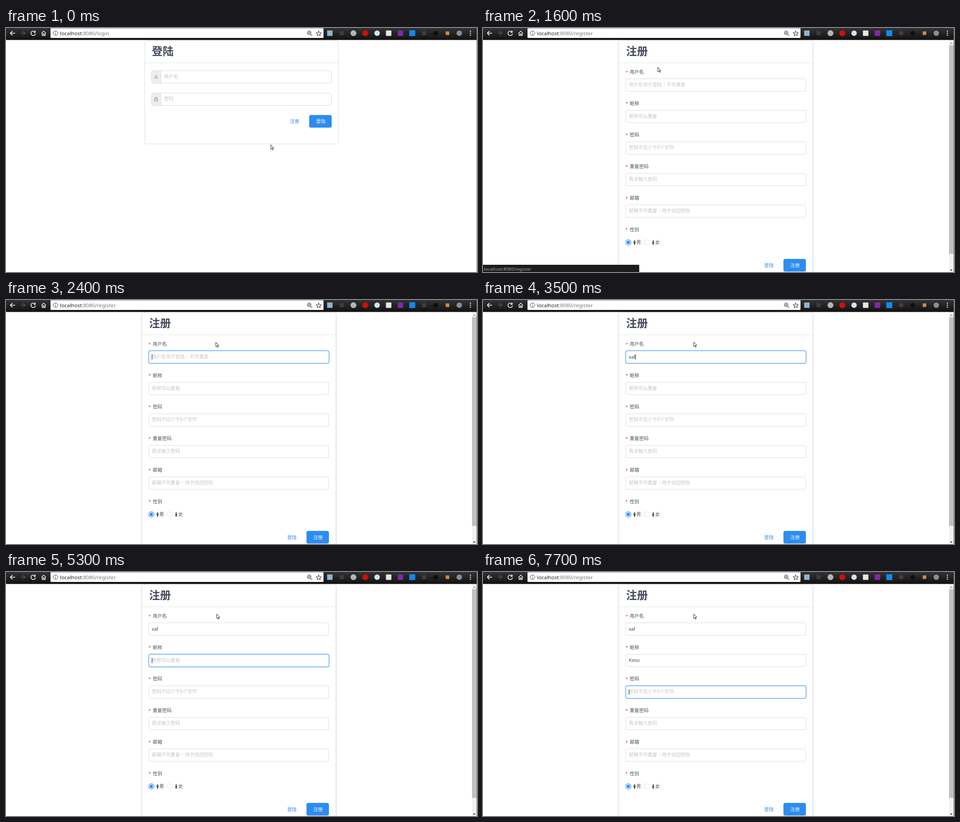
Write an HTML page that moves like this. It is 1037 px wide and 540 px high and loops after 8000 ms.

```html
<!DOCTYPE html>
<html lang="zh-TW">
<head>
<meta charset="utf-8">
<title>登陆 / 注册</title>
<style>
html, body { margin: 0; width: 100%; height: 100%; overflow: hidden; background: #fff }
svg { display: block; width: 1037px; height: 540px }
text { font: 10.4px "Liberation Sans", "Noto Sans CJK TC", "Noto Sans CJK SC", sans-serif; fill: #495060 }
.title { font-size: 24px; font-weight: bold; fill: #464c5b }
.hint { fill: #c3c6cc; font-weight: 300 }
.link { fill: #2d8cf0 }
.white { fill: #fff }
.star { fill: #ed3f14 }
.url, .url text { font: 11.37px "Noto Sans", "Open Sans", sans-serif }
.box { fill: #fff; stroke: #d7dde4 }
.line { fill: none; stroke: #fff; stroke-width: 1.5 }
</style>
</head>
<body>
<svg id="stage" viewBox="0 0 1037 540"></svg>
<script>
const stage = document.getElementById('stage');
const $ = id => document.getElementById(id);

const rect = (x, y, w, h, fill, r = 0, more = '') =>
  `<rect x="${x}" y="${y}" width="${w}" height="${h}" rx="${r}" fill="${fill}" ${more}/>`;
const circle = (x, y, r, fill, more = '') =>
  `<circle cx="${x}" cy="${y}" r="${r}" fill="${fill}" ${more}/>`;
const text = (x, y, s, cls = '', more = '') => `<text x="${x}" y="${y}" class="${cls}" ${more}>${s}</text>`;
const path = (d, more) => `<path d="${d}" ${more}/>`;
const square = (x, size, fill) => rect(x - size / 2, 11.5 - size / 2, size, size, fill, 1);

const card = (x, bottom, title, id) =>
  rect(x + .5, 27.5, 426.5, bottom - 27.5, '#fff', 4, `id="${id}"`) +
  rect(x + .5, 27.5, 426.5, bottom - 27.5, '#fff', 4, `id="${id}Edge" stroke="#dddee1"`) +
  rect(x + 1, 76.5, 426, 1, '#e2e3e6') +
  text(x + 16, 59.5, title, 'title');

const actions = (x, y, link, button, id) =>
  text(x, y + 17.5, link, 'link', `id="${id}"`) +
  rect(x + 42.5, y, 49.5, 28, '#2d8cf0', 4) +
  text(x + 57.5, y + 17.5, button, 'white');

const toolbar = () => {
  const ext = [
    square(713, 12, '#8fb4cf'), square(739, 9, '#3d3d3d'), circle(765, 11.5, 6.5, '#b4b4b4'),
    circle(791, 11.5, 6.5, '#d0100c'), circle(817, 11.5, 6, '#cfe3f5'), square(842.5, 12, '#e6e6e6'),
    square(868.5, 12, '#7d2ba8'), square(894.5, 13, '#1288f5'), circle(920.5, 11.5, 5, '#3f3f3f'),
    circle(946, 11.5, 5, '#0d0d0d'), square(972, 8, '#c98a45'), circle(998, 11.5, 6, '#8d8d8d')
  ];
  return `<linearGradient id="dark" x2="0" y2="1"><stop stop-color="#333"/><stop offset="1" stop-color="#111"/></linearGradient>` +
    rect(0, 0, 1037, 26.5, 'url(#dark)') +
    rect(98, 0.5, 601, 21.5, '#fff', 1) +
    path('M20 11.5H9.5M14.5 6.5L9.5 11.5 14.5 16.5', 'class="line"') +
    path('M32 11.5H42M37 6.5L42 11.5 37 16.5', 'class="line" style="stroke:#555"') +
    path('M63.5 8A5 5 0 1 0 65 12.5', 'class="line"') +
    path('M65 5.5V10.5H60Z', 'fill="#fff"') +
    path('M78 12L83 7 88 12M79.5 11.5V16.5H82V13H84V16.5H86.500V11.5', 'class="line" style="stroke-width:1.3"') +
    circle(109, 11.5, 5, 'none', 'stroke="#444"') +
    path('M109 11V14.5M109 8.300V9.500', 'stroke="#444" stroke-width="1.2"') +
    `<text x="119" y="16" class="url" style="fill:#222">localhost<tspan id="address" fill="#777"></tspan></text>` +
    circle(667.5, 10.5, 3.8, 'none', 'stroke="#444" stroke-width="1.3"') +
    path('M670.3 13.300L674 17M665.500 10.500H669.500M667.500 8.500V12.500', 'stroke="#444" stroke-width="1.2"') +
    path('M688.500 6.500L690 10.200 694 10.500 691 13 692 17 688.500 14.800 685 17 686 13 683 10.500 687 10.200Z',
      'fill="none" stroke="#444" stroke-width="1.1"') +
    ext.join('') +
    [7, 11.5, 16].map(y => circle(1022.5, y, 1.3, '#fff')).join('');
};

const loginInput = (y, hint, icon) =>
  rect(320.5, y, 396, 27.5, '#fff', 4, 'stroke="#d7dde4"') +
  path(`M341 ${y}H324.5Q320.5 ${y} 320.5 ${y + 4}V${y + 23.5}Q320.5 ${y + 27.5} 324.5 ${y + 27.5}H341Z`,
    'fill="#eee" stroke="#d7dde4"') +
  path(icon, `transform="translate(330.5 ${y + 13.5})" fill="none" stroke="#7d8088" stroke-width=".9"`) +
  text(348, y + 16, hint, 'hint');

const loginPage = () =>
  card(305, 256.5, '登陆', 'loginCard') +
  loginInput(94.5, '用户名', 'M-3.500 3H3.500C3.500 1.500 1 1.500 1 .5C2.500 -1 2 -3.500 0 -3.500S-2.500 -1 -1 .5C-1 1.500 -3.500 1.500 -3.500 3Z') +
  loginInput(144, '密码', 'M-3.500 -1H3.500V4H-3.500ZM-2 -1V-2.500A2 2 0 0 1 2 -2.500V-1M0 1V2.500') +
  actions(625, 192.5, '注册', '登陆', 'registerLink');

const pitch = 69.75;
const fields = [
  ['用户名', '用户名用于登陆，不可重复'],
  ['昵称', '昵称可以重复'],
  ['密码', '密码不应少于6个字符'],
  ['重复密码', '再次输入密码'],
  ['邮箱', '邮箱不可重复，用于找回密码']
];

const label = (i, s) =>
  text(314, 102.5 + i * pitch, '*', 'star', 'style="font-size:12px"') +
  text(323, 100.8 + i * pitch, s);

const field = ([name, hint], i) => {
  const y = 112.5 + i * pitch;
  return label(i, name) +
    rect(314.5, y, 396.5, 27.5, '#fff', 3.5, 'stroke="#d7dde4"') +
    `<g id="focus${i}" fill="none" stroke="#2d8cf0">` +
    rect(313.3, y - 1.2, 398.9, 29.9, 'none', 4.5, 'stroke-opacity=".25" stroke-width="1.8"') +
    rect(314.5, y, 396.5, 27.5, 'none', 3.5, 'stroke="#57a3f3"') + '</g>' +
    text(321, y + 16.3, hint, 'hint', `id="hint${i}"`) +
    text(321, y + 17, '', '', `id="value${i}"`);
};

const person = (x, d) => circle(x, 470.8, 1.3, '#495060') + path(`M${x} 472.300${d}`, 'fill="#495060"');

const registerPage = () =>
  card(299, 560, '注册', 'registerCard') +
  fields.map(field).join('') +
  label(5, '性别') +
  circle(320, 474.5, 5.8, '#fff', 'stroke="#2d8cf0" stroke-width="1.2"') + circle(320, 474.5, 3.5, '#2d8cf0') +
  person(333.7, 'h2.200v4h-1v3.500h-2.400v-3.500h-1v-4Z') + text(337.5, 478, '男') +
  circle(361, 474.5, 5.8, '#fff', 'stroke="#d7dde4"') +
  person(374.7, 'h1.200l1.300 4.500h-1.300v3h-2.400v-3h-1.300l1.300 -4.500Z') + text(379, 478, '女') +
  actions(619, 511, '登陆', '注册', 'loginLink') +
  rect(1026, 27, 10, 513, '#f1f1f1') + rect(1026, 38, 10, 462, '#c1c1c1') +
  path('M1028 35H1034L1031 31.500Z', 'fill="#a3a3a3"') +
  path('M1028 534.500H1034L1031 538Z', 'fill="#505050"') +
  rect(321, 0, 1, 12, '#222', 0, 'id="caret"');

stage.innerHTML =
  `<g id="login">${loginPage()}</g><g id="register">${registerPage()}</g>` + toolbar() +
  rect(1036, 0, 1, 540, '#777') +
  `<g id="status" class="url">${rect(-3, 524, 347, 20, '#1c1c1c', 2)}
    <text x="2" y="536.500" style="font-size:9.700px;fill:#aaa">localhost:8080/register</text></g>` +
  path('M0 0V9.800L2.300 7.800 3.900 11.300 5.300 10.700 3.800 7.300 6.700 7Z', 'id="arrow" fill="#fff" stroke="#222" stroke-width="1"') +
  path('M-1 1Q0 -.5 1 1V4L5 4.800Q6.300 5.300 6 7L5.300 10H.3L-2.700 6.300Q-2.700 4.700 -1 5.500Z', 'id="hand" fill="#fff" stroke="#222" stroke-width="1"');

// Last value whose start time has passed.
const stepAt = (steps, t, initial) => steps.reduce((v, [at, next]) => t >= at ? next : v, initial);

const route = [
  [0, 583, 258.5], [200, 583, 258.5], [900, 639, 205.5], [1400, 639, 205.5], [1600, 385, 87],
  [2200, 457, 98], [2400, 462, 93.5], [3100, 462, 93.5], [3200, 464, 93], [8000, 464, 93]
];
const focus = [
  [[2300, .5], [2400, 1], [4100, .7], [4400, 0]],
  [[4100, .7], [4400, 1], [7700, 0]],
  [[7700, 1]], [], []
];
const typed = [
  [[3200, 'xa'], [3500, 'xaf']],
  [[6200, 'K'], [6500, 'Ke'], [6800, 'Kesu']],
  [], [], []
];
const caretField = [[2300, 0], [4100, 1], [4800, -1], [5300, 1], [5900, -1], [6200, 1], [7700, 2]];

function pointerAt(t) {
  const i = Math.max(1, route.findIndex(p => p[0] >= t));
  const [t0, x0, y0] = route[i - 1], [t1, x1, y1] = route[i];
  const k = (t - t0) / (t1 - t0);
  return [x0 + (x1 - x0) * k, y0 + (y1 - y0) * k];
}

const show = (id, on) => $(id).style.display = on ? '' : 'none';
const shadow = (id, k) => {
  $(id).style.filter = k ? `drop-shadow(0 1px 2.300px rgba(0,0,0,${.24 * k}))` : 'none';
  $(id + 'Edge').style.strokeOpacity = 1 - .6 * k;
};

function draw(now) {
  const t = Math.floor(now % 8000 / 100) * 100;
  const registering = t >= 1400;
  const onLink = t >= 800 && !registering;
  show('login', !registering);
  show('register', registering);
  $('address').textContent = registering ? ':8080/register' : ':8080/login';
  show('status', t >= 1100 && t < 1900);
  $('registerLink').style.fill = onLink ? '#57a3f3' : '#2d8cf0';
  shadow('loginCard', Math.min(1, Math.max(0, (t - 200) / 200)));
  shadow('registerCard', 1);

  fields.forEach((_, i) => {
    const value = stepAt(typed[i], t, '');
    $('focus' + i).style.opacity = stepAt(focus[i], t, 0);
    $('value' + i).textContent = value;
    show('hint' + i, !value);
  });

  const active = stepAt(caretField, t, -1);
  show('caret', active >= 0);
  if (active >= 0) {
    const value = $('value' + active);
    const width = value.textContent ? value.getComputedTextLength() : 0;
    $('caret').setAttribute('x', Math.round(321 + width));
    $('caret').setAttribute('y', Math.round(120 + active * pitch));
  }

  const [x, y] = pointerAt(t);
  for (const id of ['arrow', 'hand']) {
    $(id).setAttribute('transform', `translate(${x} ${y})`);
    show(id, (id === 'hand') === onLink);
  }
}

const start = performance.now();
function tick() {
  draw(performance.now() - start);
  requestAnimationFrame(tick);
}
tick();
</script>
</body>
</html>
```
